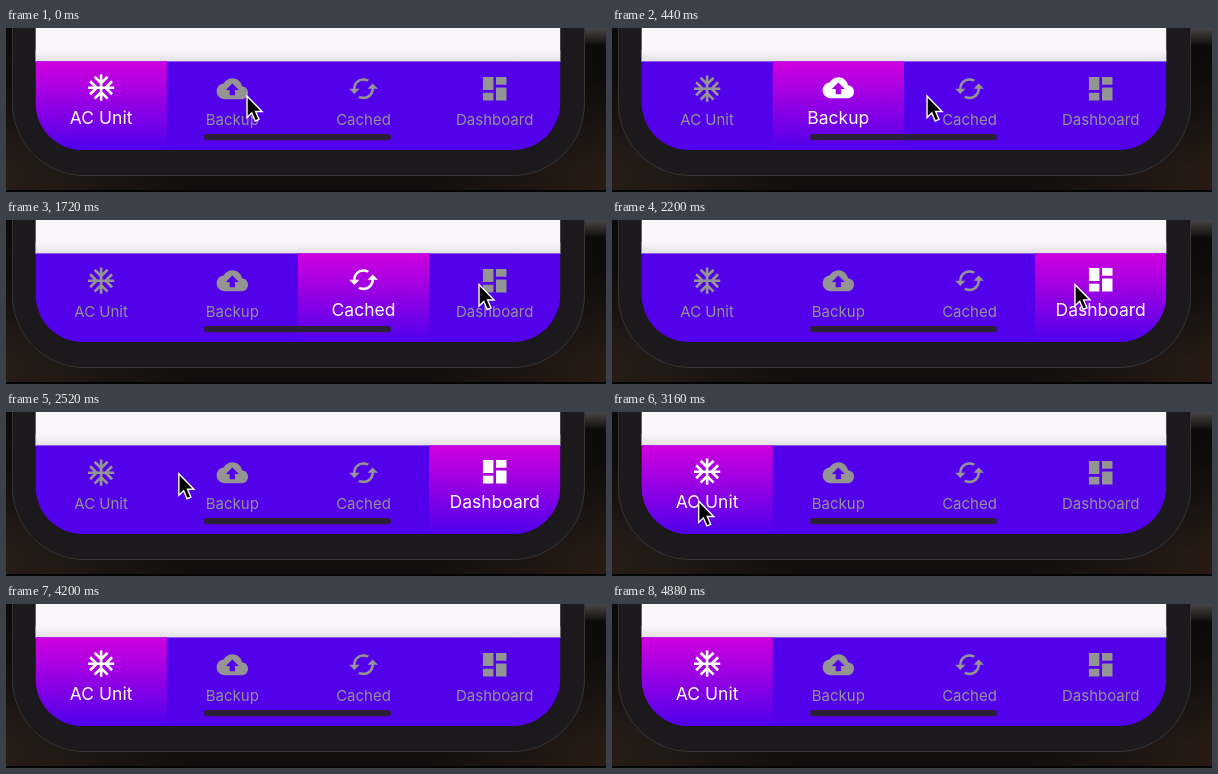
Recreate the animation shown at these times as an HTML page. Size 600x164 px, loop 4.92 s.

```html
<!DOCTYPE html>
<html>
<head>
<meta charset="utf-8">
<style>
  html, body { margin: 0; width: 100%; height: 100%; overflow: hidden; background: #0d0b0b; }
  svg { display: block; }
  text { font: 15px Inter, sans-serif; text-anchor: middle; }
</style>
</head>
<body>
<svg width="600" height="164" viewBox="0 0 600 164">
  <defs>
    <linearGradient id="glow" x2="0" y2="1">
      <stop stop-color="#d000de"/><stop offset=".97" stop-color="#5300eb"/>
    </linearGradient>
    <linearGradient id="shade" x2="0" y2="1">
      <stop stop-color="#f9f7fb"/><stop offset="1" stop-color="#e2e0e5"/>
    </linearGradient>
    <linearGradient id="room">
      <stop stop-color="#271d17"/><stop offset=".3" stop-color="#120f0e"/>
      <stop offset=".7" stop-color="#120f0e"/><stop offset="1" stop-color="#271b14"/>
    </linearGradient>
    <linearGradient id="dusk" x2="0" y2="1">
      <stop stop-color="#0b0a0a"/><stop offset=".3" stop-color="#0b0a0a" stop-opacity=".9"/>
      <stop offset=".85" stop-color="#0b0a0a" stop-opacity="0"/>
    </linearGradient>
    <linearGradient id="lamp" x2="0" y2="1">
      <stop stop-color="#4a4645"/><stop offset="1" stop-color="#4a4645" stop-opacity="0"/>
    </linearGradient>
    <clipPath id="screen"><rect x="29.7" y="-100" width="524.5" height="222" rx="47"/></clipPath>
  </defs>
  <rect width="600" height="164" fill="url(#room)"/>
  <rect width="600" height="164" fill="url(#dusk)"/>
  <rect x="570" width="30" height="18" fill="url(#lamp)"/>
  <rect y="162" width="600" height="2" fill="#050404"/>
  <rect x="6.5" y="-100" width="572" height="247.5" rx="72" fill="#1b191c" stroke="#363435"/>
  <g clip-path="url(#screen)">
    <rect x="29" width="526" height="34" fill="#f9f7fb"/>
    <rect x="29" y="22" width="526" height="12" fill="url(#shade)"/>
    <rect x="29" y="33.4" width="526" height="90" fill="#5300eb"/>
    <rect id="marker" y="33.4" width="131.2" height="89" fill="url(#glow)"/>
    <g id="items"></g>
    <rect x="198" y="106" width="187" height="6.2" rx="3.1" fill="#2c2038"/>
  </g>
  <path id="cursor" d="M0 0V21.5L4.8 16.9 8.2 25 12 23.4 8.6 15.5H15.1Z" fill="#000" stroke="#fff" stroke-width="1.4"/>
</svg>
<script>
const LOOP = 4920, ITEM = 131.2, LEFT = 29.5, SWITCH = 200;
const ICONS = [
  ['AC Unit', 'M12 2V22M2 12H22M7.05 3.64 12 8.59 16.95 3.64M7.05 20.36 12 15.41 16.95 20.36M3.64 7.05 8.59 12 3.64 16.95M20.36 7.05 15.41 12 20.36 16.95', true],
  ['Backup', 'M19.35 10.04C18.67 6.59 15.64 4 12 4 9.11 4 6.6 5.64 5.35 8.04 2.34 8.36 0 10.91 0 14c0 3.31 2.69 6 6 6h13c2.76 0 5-2.24 5-5 0-2.64-2.05-4.78-4.65-4.96zM14 13v4h-4v-4H7l5-5 5 5h-3z'],
  ['Cached', 'M19 8l-4 4h3c0 3.31-2.69 6-6 6-1.01 0-1.97-.25-2.8-.7l-1.46 1.46C8.97 19.54 10.43 20 12 20c4.42 0 8-3.58 8-8h3zM6 12c0-3.31 2.69-6 6-6 1.01 0 1.97.25 2.8.7l1.46-1.46C15.03 4.46 13.57 4 12 4c-4.42 0-8 3.58-8 8H1l4 4 4-4z'],
  ['Dashboard', 'M3 13h8V3H3zm0 8h8v-6H3zm10 0h8V11h-8zm0-18v6h8V3z']
];
// [time, tab]
const TAPS = [[40, 1], [1055, 2], [1800, 3], [2800, 0]];
// [time, x, y]
const PATH = [[0, 241, 68], [200, 241, 68], [593, 352, 68], [900, 352, 63.5], [1250, 352, 63.5],
  [1600, 473, 64.5], [2150, 473, 64.5], [2674, 95, 61], [3050, 95, 63], [3400, 60, 172]];

const $ = id => document.getElementById(id);
const mix = (a, b, p) => a + (b - a) * p;
const smooth = u => u * u * (3 - 2 * u);

// cubic-bezier(.4, 0, .2, 1)
function ease(x) {
  if (x <= 0 || x >= 1) return x <= 0 ? 0 : 1;
  let lo = 0, hi = 1, s;
  for (let i = 0; i < 20; i++) {
    s = (lo + hi) / 2;
    if (1.2 * s * (1 - s) ** 2 + .6 * s * s * (1 - s) + s ** 3 < x) lo = s; else hi = s;
  }
  return smooth(s);
}

$('items').innerHTML = ICONS.map(([label, d, stroked], i) => `
  <g transform="translate(${LEFT + ITEM * (i + .5)})">
    <g><path d="${d}" transform="translate(-15.7 45) scale(1.31)"
      ${stroked ? 'fill="none" stroke="currentColor" stroke-width="2"' : 'fill="currentColor"'}/></g>
    <text fill="currentColor">${label}</text>
  </g>`).join('');
const items = [...$('items').children];

function draw(t) {
  let from = 0, to = 0, p = 1;
  for (const [time, tab] of TAPS) {
    if (t >= time) [from, to, p] = [to, tab, ease((t - time) / SWITCH)];
  }
  $('marker').setAttribute('x', LEFT + ITEM * mix(from, to, p));
  items.forEach((item, i) => {
    const on = i === to ? p : i === from ? 1 - p : 0;
    const grey = Math.round(mix(148, 255, on));
    const lift = on ** 3;
    const [icon, label] = item.children;
    item.style.color = `rgb(${grey},${grey},${grey})`;
    icon.setAttribute('transform', `translate(0 ${-lift})`);
    label.setAttribute('transform', `translate(0 ${97.2 - lift * .8}) scale(${mix(1, 1.167, on)})`);
  });

  const next = PATH.findIndex(k => k[0] > t);
  $('cursor').style.display = next < 0 ? 'none' : '';
  if (next > 0) {
    const a = PATH[next - 1], b = PATH[next], u = smooth((t - a[0]) / (b[0] - a[0]));
    $('cursor').setAttribute('transform', `translate(${mix(a[1], b[1], u)} ${mix(a[2], b[2], u)})`);
  }
}

const start = performance.now();
function tick() {
  draw((performance.now() - start) % LOOP);
  requestAnimationFrame(tick);
}
tick();
</script>
</body>
</html>
```
